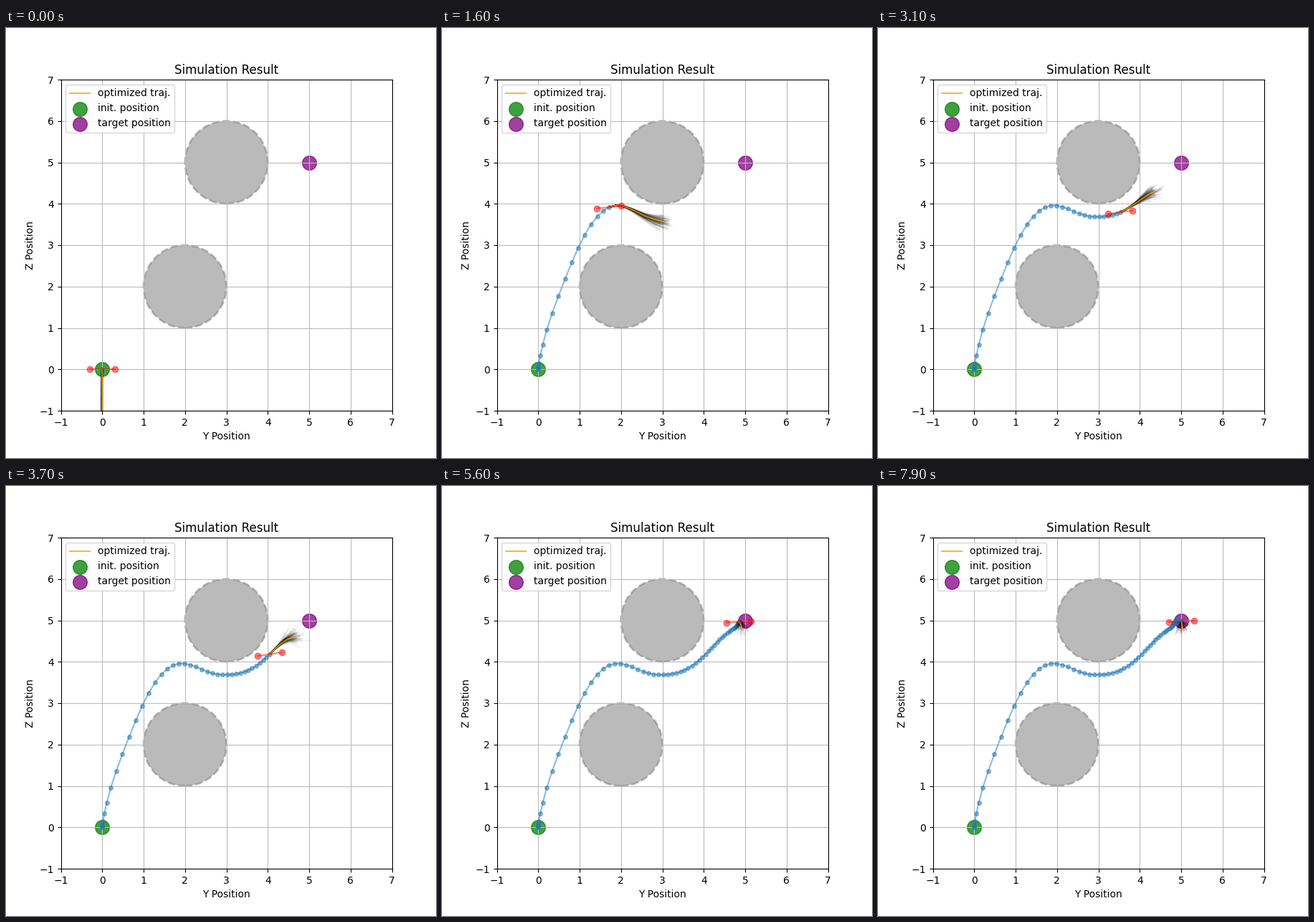
Write a matplotlib script that moves like this. It is 600 px wide and 600 px high and loops after 8000 ms.

```python
import numpy as np
import matplotlib.pyplot as plt
from matplotlib.animation import FuncAnimation
from matplotlib.collections import LineCollection

FRAMES, HORIZON, SAMPLES, ARM = 80, 10, 100, 0.3

# way points of the flight: step, y, z
WAY = np.array([
    (0, 0, 0), (4, .05, .325), (6, .205, .95), (9, .65, 2.185),
    (12, 1.12, 3.243), (15, 1.572, 3.83), (18, 1.99, 3.957),
    (22, 2.54, 3.762), (27, 3.13, 3.692), (32, 3.623, 3.843),
    (37, 4.047, 4.183), (43, 4.445, 4.593), (50, 4.775, 4.852),
    (56, 4.845, 4.96), (65, 4.896, 4.991), (79, 5.01, 4.975),
])
TILT_STEPS = (0, 4, 9, 15, 24, 50, 59, 72, 79)
TILT_DEG = (0, -16, -15.3, 5, 7.5, 9, 0, 0, 3.4)


def spline(t, tk, p):
    """Natural cubic spline through the points p at times tk."""
    n, h = len(tk), np.diff(tk)[:, None]
    slope = np.diff(p, axis=0) / h
    a, rhs = np.eye(n), np.zeros_like(p)
    for i in range(1, n - 1):
        a[i, i - 1:i + 2] = h[i - 1, 0], 2 * (h[i - 1, 0] + h[i, 0]), h[i, 0]
        rhs[i] = 6 * (slope[i] - slope[i - 1])
    m = np.linalg.solve(a, rhs)
    k = np.clip(np.searchsorted(tk, t, side="right") - 1, 0, n - 2)
    d = (t - tk[k])[:, None]
    start = slope[k] - h[k] * (2 * m[k] + m[k + 1]) / 6
    return (p[k] + start * d + m[k] * d ** 2 / 2
            + (m[k + 1] - m[k]) * d ** 3 / (6 * h[k]))


steps = np.minimum(np.arange(FRAMES + HORIZON), FRAMES - 1)
path = spline(steps, WAY[:, 0], WAY[:, 1:])
u = np.linspace(0, 1, HORIZON + 1)[:, None]


def plan(n):
    """Optimized trajectory and the random samples around it."""
    rng = np.random.default_rng(100 + n)
    if n == 0:  # no thrust yet: free fall
        best = u ** 2 * [0, -3]
        spread = rng.normal(-.012, .008, (SAMPLES, 1, 1)) * [1, 0]
        return best, best + spread * np.sqrt(u)
    sag = .15 - .33 * min(n / 20, 1)
    best = path[n:n + HORIZON + 1] + u ** 2 * [.02, sag]
    end = rng.normal(0, .1, (SAMPLES, 1, 2))
    curl = rng.normal(0, .03, (SAMPLES, 1, 2))
    return best, best + end * u ** 2 + curl * (u ** 4 - u ** 2)


fig, ax = plt.subplots(figsize=(6, 6), dpi=100)
ax.set_aspect("equal")
ax.set_xlim(-1, 7)
ax.set_ylim(-1, 7)
ax.set_xticks(range(-1, 8))
ax.set_yticks(range(-1, 8))
ax.grid(True, color="#bababa")
ax.set_title("Simulation Result")
ax.set_xlabel("Y Position")
ax.set_ylabel("Z Position")

for center in ((2, 2), (3, 5)):
    ax.add_patch(plt.Circle(center, 1, color="gray", alpha=.54,
                            ls="--", lw=2))

trail, = ax.plot([], [], "o-", color="tab:blue", ms=4, alpha=.5)
fan = LineCollection([], colors="black", alpha=.055, linewidths=1.5, zorder=2)
ax.add_collection(fan, autolim=False)
best_line, = ax.plot([], [], color="orange", alpha=.8,
                     label="optimized traj.")
drone, = ax.plot([], [], "o-", color="red", alpha=.5)
ax.scatter(0, 0, s=200, color="green", alpha=.75, label="init. position")
ax.scatter(5, 5, s=200, color="purple", alpha=.75, label="target position")
ax.legend(loc="upper left")


def update(n):
    best, samples = plan(n)
    trail.set_data(*path[:n + 1].T)
    fan.set_segments(list(samples))
    best_line.set_data(*best.T)
    a = np.radians(np.interp(n, TILT_STEPS, TILT_DEG))
    arm = ARM * np.array([np.cos(a), np.sin(a)])
    drone.set_data(*np.array([path[n] - arm, path[n] + arm]).T)
    return trail, fan, best_line, drone


anim = FuncAnimation(fig, update, frames=FRAMES, interval=100,
                     init_func=lambda: update(0), repeat=True, repeat_delay=0)
plt.show()
```
